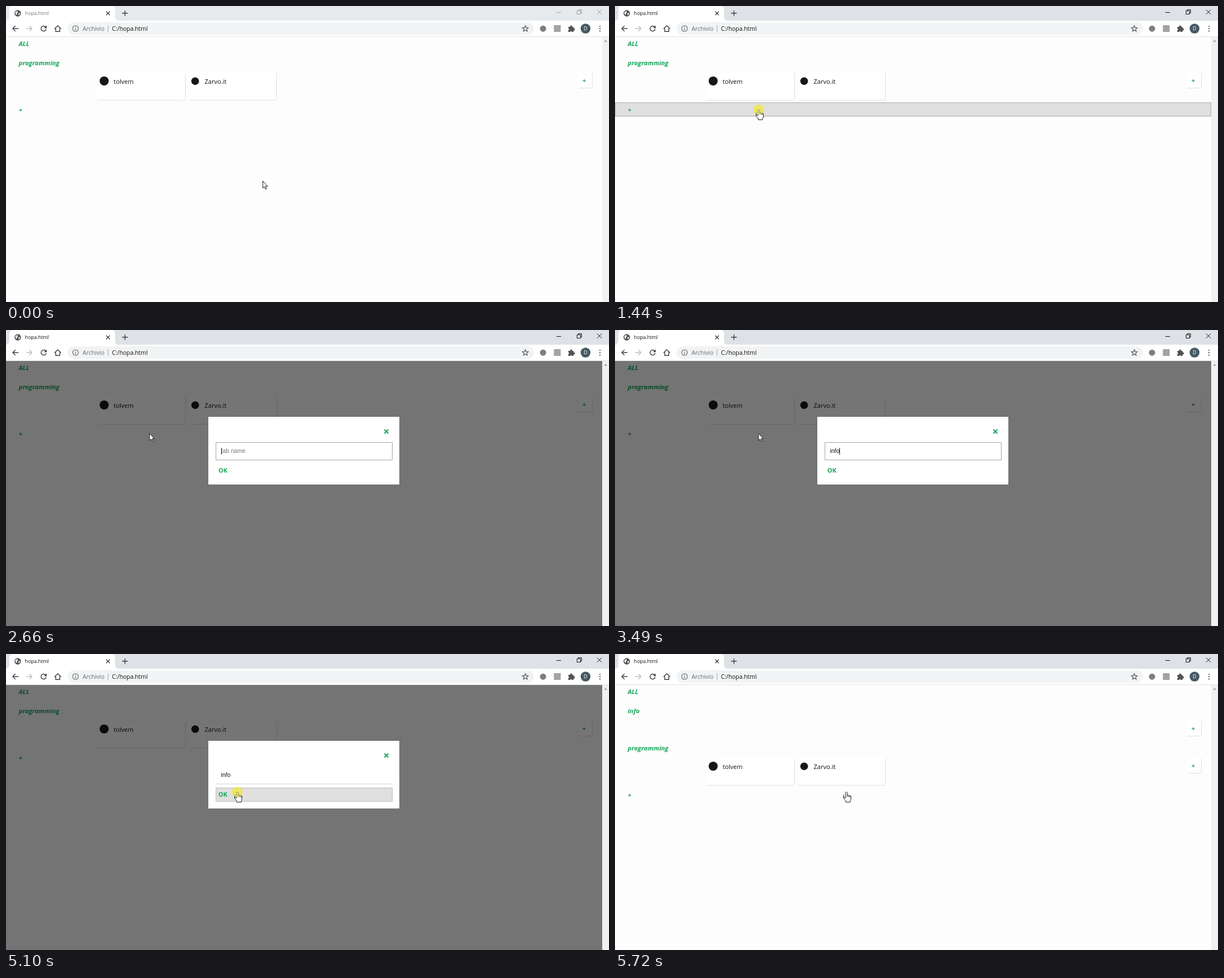
These frames come from a looping animation (1067x525 px, 6920 ms). An HTML page:

```html
<!DOCTYPE html>
<html lang="it">
<head>
<meta charset="utf-8">
<title>hopa.html</title>
<style>
  html, body { margin: 0; width: 100%; height: 100%; overflow: hidden; background: #fdfdfd; }
  svg { display: block; width: 1067px; height: 525px; }
  text { font: 11px "Open Sans", "Noto Sans", sans-serif; fill: #111; }
  .head { font-weight: 700; font-style: italic; font-size: 11.3px; fill: #19a55b; }
  .btn { font-weight: 700; fill: #19a55b; }
  .url { font-size: 10.4px; }
  .field { font: 10.4px "Liberation Sans", Arial, sans-serif; }
  .line { fill: none; stroke: #3c4043; stroke-width: 1.4; }
  .edge { fill: none; stroke: #dedede; }
  #controls { fill: none; stroke: #111; }
  .inactive #controls { stroke: #999; }
  .inactive #title { fill: #77797c; }
  .inactive #strip { fill: #e7eaed; }
</style>
</head>
<body>
<svg id="stage" viewBox="0 0 1067 525">
  <defs>
    <g id="plusCard">
      <rect x="1012" y="118" width="26" height="27" fill="#fff"/>
      <path class="edge" d="M1037.5 119V144Q1037.5 145.5 1036 145.5H1013"/>
      <text class="btn" x="1020" y="135.5">+</text>
    </g>
    <g id="card">
      <rect width="156" height="49" fill="#fff"/>
      <path class="edge" d="M155.5 1V47Q155.5 49 153.5 49H1"/>
    </g>
  </defs>

  <!-- page -->
  <rect y="55" width="1055" height="470" fill="#fdfdfd"/>
  <text class="head" x="22.5" y="71">ALL</text>
  <g id="added">
    <text class="head" x="22.5" y="105">info</text>
    <use href="#plusCard"/>
  </g>
  <g id="tab">
    <text class="head" x="22.5" y="105">programming</text>
    <use href="#card" x="162" y="118"/>
    <use href="#card" x="323" y="118"/>
    <circle cx="173.7" cy="133" r="8" fill="#17171b"/>
    <circle cx="334.7" cy="133.3" r="6.8" fill="#171717"/>
    <text x="190.5" y="137.5">tolvem</text>
    <text x="351.5" y="137.5">Zarvo.it</text>
    <use href="#plusCard"/>
  </g>
  <rect id="bar" x=".5" y="171.5" width="1054" height="24" fill="#dfdfdf" stroke="#ababab"/>
  <text id="addTab" class="btn" x="22.8" y="187.7">+</text>

  <!-- dialog -->
  <rect id="shade" y="55" width="1055" height="470" fill="#000" opacity=".54"/>
  <g id="dialog">
    <rect x="358" y="154" width="338" height="120" fill="#fff"/>
    <path d="M669.5 176.5L676.5 183.5M676.5 176.5L669.5 183.5" stroke="#19a55b" stroke-width="2"/>
    <rect id="box" x="371.5" y="199.5" width="312" height="31" fill="none" stroke="#a6a6a6"/>
    <path id="underline" d="M371 230.5H684" stroke="#d2d2d2"/>
    <text id="entry" class="field" x="380.5" y="218.3"></text>
    <path id="caret" d="M0 209V221" stroke="#111"/>
    <rect id="okBar" x="371.5" y="237.5" width="312" height="24" fill="#dfdfdf" stroke="#bcbcbc"/>
    <text class="btn" x="375.8" y="253.3">OK</text>
  </g>

  <!-- scrollbar -->
  <rect x="1055" y="55" width="12" height="470" fill="#f1f1f1"/>
  <path d="M1058 63.5L1061 60L1064 63.5Z" fill="#a3a3a3"/>

  <!-- tab strip -->
  <rect id="strip" width="1067" height="26" fill="#dee1e6"/>
  <path d="M0 26Q6 26 6 19V6Q6 0 12 0H187Q193 0 193 6V19Q193 26 199 26Z" fill="#fff"/>
  <circle cx="20.8" cy="13" r="5.7" fill="#4c5054"/>
  <path d="M16.5 11.5Q18 9 21 9.4Q21.6 11.8 19.4 12.6Q20 14.5 18.6 16Q16.4 14 16.5 11.5ZM21.5 13.2L25 12.2Q25.3 15 22.3 17Q23.2 14.7 21.5 13.2Z" fill="#fff"/>
  <text id="title" x="33.5" y="16.2" style="font-size:8.8px">hopa.html</text>
  <path class="line" d="M177.3 9.8L183.7 16.2M183.7 9.8L177.3 16.2M205.5 12.8H215.5M210.5 8V17.8"/>
  <g id="controls">
    <path d="M974 11.5H982M1046 6.5L1054 14.5M1054 6.5L1046 14.5"/>
    <path d="M1010.5 8.5H1016.5V14.5H1010.5ZM1012.5 8V6.5H1018.5V12.5H1017"/>
  </g>

  <!-- toolbar -->
  <rect y="26" width="1067" height="28" fill="#fff"/>
  <path d="M0 54.5H1067" stroke="#dfe1e4"/>
  <rect x="109" y="29" width="825" height="22" rx="11" fill="#f1f3f4"/>
  <path class="line" d="M22 40H12M16.7 35.3L12 40L16.7 44.7"/>
  <path class="line" d="M36 40H46M41.3 35.3L46 40L41.3 44.7" style="stroke:#bcbec1"/>
  <path class="line" d="M70.4 37.3A4.6 4.6 0 1 0 71.2 41"/>
  <path d="M72 34.5V39.2H67.3Z" fill="#3c4043"/>
  <path class="line" d="M85.8 40.5L91.6 35L97.4 40.5M88 39.5V45.3H95.2V39.5"/>
  <circle class="line" cx="123" cy="40" r="5" style="stroke:#5f6368;stroke-width:1.1"/>
  <path d="M123 39.2V43M123 36.8V38.1" stroke="#5f6368" stroke-width="1.2"/>
  <text class="url" x="135.5" y="43.8" style="fill:#696d72">Archivio</text>
  <path d="M180.5 34V46" stroke="#a4a7aa"/>
  <text class="url" x="187.5" y="43.8">C:/hopa.html</text>
  <path id="star" fill="none" stroke="#4c5054" stroke-width="1.1"/>
  <circle cx="950.3" cy="40.2" r="5.5" fill="#7c7f82"/>
  <rect x="969.5" y="34" width="12" height="12" fill="#a3a3a3"/>
  <path d="M995 37H998.2A1.9 1.9 0 1 1 1001.8 37H1004.3V39.6A1.9 1.9 0 1 1 1004.3 43.2V46H1001.5A1.7 1.7 0 0 0 998.2 46H995V42.8A1.7 1.7 0 0 0 995 39.5Z" fill="#4f5357"/>
  <circle cx="1025.5" cy="40" r="8.7" fill="#455a64"/>
  <text x="1025.5" y="43.2" text-anchor="middle" style="fill:#fff;font-size:8.8px">D</text>
  <path d="M1051 36V36.01M1051 40.2V40.21M1051 44.4V44.41" stroke="#4c5054" stroke-width="2.2" stroke-linecap="round"/>

  <!-- pointer -->
  <g id="pointer" stroke="#1a1a1a" stroke-linejoin="round">
    <circle id="glow" cx="-.5" cy="1" r="9.3" fill="#ebe663" stroke="none"/>
    <path id="arrow" d="M.5 .5V13L3.3 10.4L5.2 14.8L7.1 14L5.2 9.7H9Z" fill="#fff"/>
    <path id="hand" d="M-1.5 10V1.8Q0-.8 1.5 1.8V6.5Q3 5.4 4 7Q5.5 6 6.3 7.6Q7.8 7 8 9V13Q7.8 15.5 6.5 17V18.8H-1V17Q-3 15-5 11.4Q-5-.1 -5 11.4Q-5 9.2-3 10.2L-1.5 11.7ZM1.5 6.5V9.5M4 7V9.8M6.3 7.6V10" fill="#fff"/>
    <circle id="tint" cx="-.5" cy="1" r="9.3" fill="#ebe663" opacity=".5" stroke="none"/>
  </g>
</svg>
<script>
const LOOP = 6920;
const start = {
  active: false, x: 454, y: 310, hand: false, click: false,
  bar: 0, zoom: 0, text: "", caret: 0, ok: 0, line: false, moved: false, fade: 1
};

// Each step lists only what changes at that time.
const steps = [
  [0, {}],
  [200, { active: true }],
  [630, { x: 350, y: 268 }],
  [820, { x: 292, y: 224 }],
  [1030, { x: 261, y: 187, hand: true, bar: .03 }],
  [1240, { x: 254.5, y: 183, bar: .55 }],
  [1440, { click: true, bar: 1 }],
  [1650, { x: 253.5, y: 183, hand: false, click: false, bar: .3, zoom: .705, caret: 381.5 }],
  [1870, { bar: .03, zoom: .998 }],
  [2060, { bar: 0, zoom: 1, caret: 0 }],
  [2660, { caret: 381.5 }],
  [3070, { text: "i", caret: 383.5 }],
  [3270, { text: "in", caret: 389.5 }],
  [3490, { text: "info", caret: 397.5 }],
  [4100, { caret: 0 }],
  [4280, { x: 298.5, y: 169 }],
  [4500, { x: 358.5, y: 208 }],
  [4690, { x: 388.5, y: 231 }],
  [4900, { x: 408.5, y: 243, hand: true, ok: .06 }],
  [5100, { x: 409.5, y: 244, click: true, ok: 1, line: true }],
  [5310, { click: false, zoom: 0 }],
  [5490, { moved: true, fade: .5 }],
  [5720, { fade: 1 }]
];
let last = start;
const states = steps.map(([at, change]) => (last = { ...last, ...change, at }));

const $ = id => document.getElementById(id);
const set = (id, name, value) => $(id).setAttribute(name, value);
const show = (id, on) => set(id, "visibility", on ? "visible" : "hidden");

// Five-pointed bookmark star.
const points = Array.from({ length: 10 }, (_, i) => {
  const r = i % 2 ? 2.4 : 5.6, a = i * Math.PI / 5;
  return `${919 + r * Math.sin(a)} ${40.3 - r * Math.cos(a)}`;
});
set("star", "d", `M${points.join("L")}Z`);

function draw(s) {
  $("stage").classList.toggle("inactive", !s.active);

  show("added", s.moved);
  set("added", "opacity", s.fade);
  set("tab", "opacity", s.fade);
  const shift = `translate(0 ${s.moved ? 66 : 0})`;
  set("tab", "transform", shift);
  set("addTab", "transform", shift);
  show("addTab", s.fade === 1);
  set("bar", "opacity", s.bar);

  const open = s.zoom > 0;
  $("shade").style.display = $("dialog").style.display = open ? "" : "none";
  set("dialog", "transform", `translate(527 214) scale(${s.zoom}) translate(-527 -214)`);
  $("entry").textContent = s.text || "tab name";
  $("entry").style.fill = s.text ? "#111" : "#777";
  $("caret").style.display = s.caret ? "" : "none";
  set("caret", "transform", `translate(${s.caret} 0)`);
  set("okBar", "opacity", s.ok);
  $("box").style.display = s.line ? "none" : "";
  $("underline").style.display = s.line ? "" : "none";

  set("pointer", "transform", `translate(${s.x} ${s.y})`);
  show("arrow", !s.hand);
  show("hand", s.hand);
  show("glow", s.click);
  show("tint", s.click);
}

let shown;
function tick() {
  const t = performance.now() % LOOP;
  const state = states.filter(s => s.at <= t).pop();
  if (state !== shown) draw(shown = state);
  requestAnimationFrame(tick);
}
tick();
</script>
</body>
</html>
```
